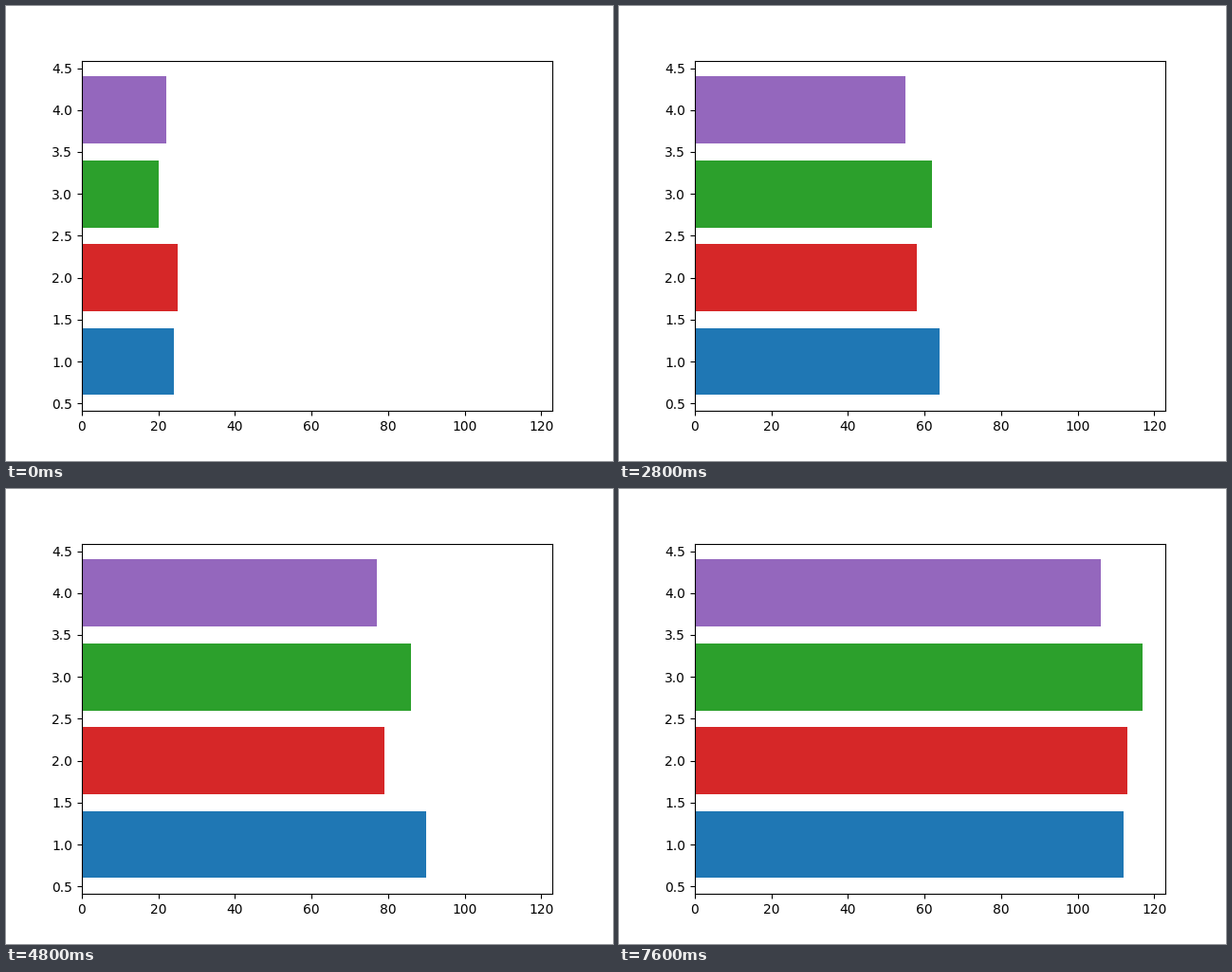
A matplotlib script for the animation above (8000 ms loop, 640x480 px).

```python
import numpy as np
import matplotlib.pyplot as plt
from matplotlib.animation import ArtistAnimation

STEPS = 20
INTERVAL = 400  # ms
START = 20
COLORS = ["tab:blue", "tab:red", "tab:green", "tab:purple"]

# Each bar grows by a random whole amount from 0 to 9 per step.
rng = np.random.default_rng(19680801)
growth = rng.integers(low=0, high=10, size=(STEPS, len(COLORS)))
levels = START + growth.cumsum(axis=0)
positions = np.arange(1, len(COLORS) + 1)

fig, ax = plt.subplots(figsize=(6.4, 4.8), dpi=100)
frames = [ax.barh(positions, row, color=COLORS) for row in levels]

anim = ArtistAnimation(fig, frames, interval=INTERVAL, repeat=True, repeat_delay=0)
plt.show()
```
